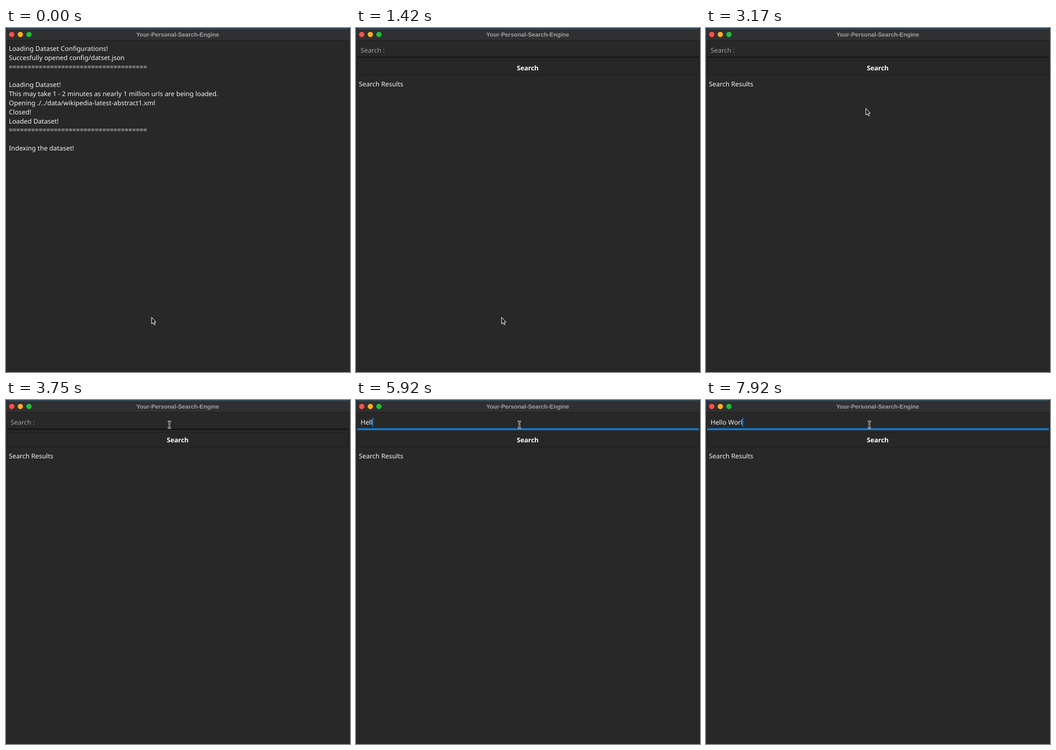
Write an HTML page that moves like this. It is 600 by 601 pixels and loops after 8 s.

```html
<!DOCTYPE html>
<html lang="en">
<head>
<meta charset="utf-8">
<title>Your-Personal-Search-Engine</title>
<style>
  html, body { margin: 0; width: 100%; height: 100%; overflow: hidden; background: #292829; }
  svg { display: block; width: 600px; height: 601px; }
  text {
    font: 11.4px "Noto Sans", "Open Sans", sans-serif;
    fill: #f4f4f4;
    white-space: pre;
    text-rendering: geometricPrecision;
  }
  .title { font: bold 10.25px "Liberation Sans", Arial, sans-serif; fill: #a2a1a2; text-anchor: middle; }
  .label { font-weight: bold; text-anchor: middle; fill: #fff; }
  .hint { fill: #a0a0a0; }
</style>
</head>
<body>
<svg viewBox="0 0 600 601">
  <rect width="600" height="601" fill="#292829"/>
  <rect width="600" height="10" fill="#1d3a4c"/>
  <path d="M0 22V6Q0 1 5 1H595Q600 1 600 6V22Z" fill="#302f31"/>
  <path d="M4 1.5H596" stroke="#47525a"/>
  <rect y="21" width="600" height="1" fill="#1f1e1f"/>
  <circle cx="10" cy="11.3" r="4.6" fill="#fd5149"/>
  <circle cx="25" cy="11.3" r="4.6" fill="#fdb024"/>
  <circle cx="40" cy="11.3" r="4.6" fill="#1fc138"/>
  <text class="title" x="299.5" y="14.6">Your-Personal-Search-Engine</text>

  <g id="log"></g>

  <g id="app">
    <rect id="line" x="2" y="49.5" width="596" height="3" fill="#191819"/>
    <rect x="2.5" y="56.5" width="595" height="26" fill="#282728" stroke="#1f1e1f"/>
    <text class="label" x="299.5" y="74.1">Search</text>
    <text x="5" y="101.8">Search Results</text>
    <text id="entry" x="8" y="43.2"></text>
    <rect id="caret" y="31" width="1.6" height="15.5" fill="#0d84e8"/>
  </g>

  <path id="arrow" d="M.5 .5V12L3.1 9.6L4.9 13.6L6.7 12.8L5 8.9H8Z" fill="#111" stroke="#fff" stroke-linejoin="round"/>
  <g id="beam" fill="none">
    <path d="M-3 -5.5H-1.5L0 -4.5L1.5 -5.5H3M-3 6H-1.5L0 5L1.5 6H3M0 -4.5V5M-1.5 1.5H1.5" stroke="#eee" stroke-width="2.6"/>
    <path d="M-3 -5.5H-1.5L0 -4.5L1.5 -5.5H3M-3 6H-1.5L0 5L1.5 6H3M0 -4.5V5M-1.5 1.5H1.5" stroke="#161616" stroke-width="1"/>
  </g>
</svg>
<script>
const LOOP = 8000, FPS = 12;
const READY = 1415, MOVE = 2500, FOCUS = 3830;
const PHRASE = "Hello Worl";
const KEYS = [4915, 5330, 5750, 5915, 6080, 6330, 7080, 7330, 7665, 7830];
const FROM = { x: 253.5, y: 505 }, TO = { x: 285, y: 43 };

const rule = "=".repeat(37);
const LINES = [
  "Loading Dataset Configurations!",
  "Succesfully opened config/datset.json",
  rule, "",
  "Loading Dataset!",
  "This may take 1 - 2 minutes as nearly 1 million urls are being loaded.",
  "Opening ./../data/wikipedia-latest-abstract1.xml",
  "Closed!",
  "Loaded Dataset!",
  rule, "",
  "Indexing the dataset!"
];

const $ = id => document.getElementById(id);
const show = (el, on) => el.setAttribute("visibility", on ? "visible" : "hidden");
const place = (el, x, y) => el.setAttribute("transform", `translate(${x} ${y})`);
const ease = p => p * p * p * (10 + p * (6 * p - 15));

const [log, app, line, entry, caret, arrow, beam] =
  ["log", "app", "line", "entry", "caret", "arrow", "beam"].map($);

LINES.forEach((s, i) => {
  const t = document.createElementNS("http://www.w3.org/2000/svg", "text");
  t.setAttribute("x", 5);
  t.setAttribute("y", (40.1 + i * 15.82).toFixed(2));
  t.textContent = s;
  log.append(t);
});

const pen = document.createElement("canvas").getContext("2d");
pen.font = '114px "Noto Sans", "Open Sans", sans-serif';
const textWidth = s => pen.measureText(s).width / 10;

function drawPointer(t) {
  const tick = Math.floor((t + 4) * FPS / 1000) * 1000 / FPS;
  const k = ease(Math.min(1, Math.max(0, (tick - MOVE) / 1000)));
  const x = FROM.x + (TO.x - FROM.x) * k;
  const y = FROM.y + (TO.y - FROM.y) * k;
  const overField = y < 53;
  show(arrow, !overField);
  show(beam, overField);
  place(overField ? beam : arrow, x, y);
}

function drawEntry(t) {
  const typed = PHRASE.slice(0, KEYS.filter(k => t >= k).length);
  const focused = t >= FOCUS;
  entry.textContent = typed || "Search :";
  entry.setAttribute("class", typed ? "" : "hint");
  line.setAttribute("fill", focused ? "#0d84e8" : "#191819");
  caret.setAttribute("x", (7.8 + textWidth(typed)).toFixed(2));
  show(caret, focused);
}

function draw(t) {
  show(log, t < READY);
  app.style.display = t < READY ? "none" : "";
  drawEntry(t);
  drawPointer(t);
}

let start;
function loop(now) {
  start ??= now;
  draw((now - start) % LOOP);
  requestAnimationFrame(loop);
}
draw(0);
requestAnimationFrame(loop);
</script>
</body>
</html>
```
